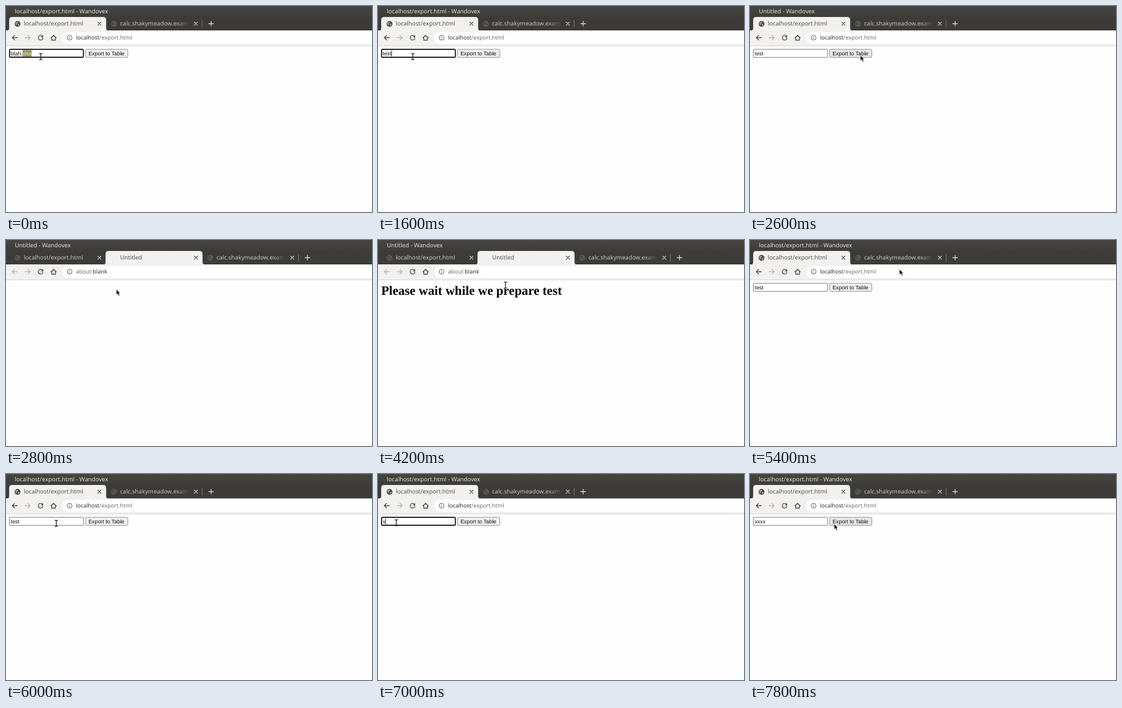
An HTML page that plays this animation: 600x338 px, repeating every 8 s.

```html
<!DOCTYPE html>
<html lang="en">
<head>
<meta charset="utf-8">
<title>Export demo</title>
<style>
  html, body { margin: 0; width: 100%; height: 100%; overflow: hidden; background: #fefefe; }
  svg { display: block; width: 100vw; height: 100vh; }
  text { text-rendering: geometricPrecision; white-space: pre; }
  .ui { font-family: "Noto Sans", "Open Sans", sans-serif; font-size: 9.68px; }
  .url { font-size: 9.1px; }
  .form { font-family: "Liberation Sans", Arial, sans-serif; font-size: 8.85px; }
  .heading { font: bold 21.1px "Liberation Serif", "Times New Roman", serif; }
  .line { fill: none; stroke-width: 1.3; stroke-linecap: round; }
</style>
</head>
<body>
<svg viewBox="0 0 600 338" xmlns="http://www.w3.org/2000/svg">
  <defs>
    <linearGradient id="bar" x2="0" y2="1">
      <stop stop-color="#46453f"/><stop offset=".5" stop-color="#3c3b37"/>
    </linearGradient>
    <linearGradient id="fade" gradientUnits="userSpaceOnUse" x1="92" x2="115">
      <stop stop-color="#c3c2be"/><stop offset="1" stop-color="#c3c2be" stop-opacity="0"/>
    </linearGradient>
    <path id="tabShape" d="M-4 40.5Q0 40.5 0 36V23Q0 18 5 18H154Q159 18 159 23V36Q159 40.5 163 40.5Z"/>
    <path id="cross" class="line" d="M-2.5-2.5L2.5 2.5M2.5-2.5L-2.5 2.5"/>
    <g id="globe">
      <circle r="4.8" fill="currentColor"/>
      <path d="M-3.6-1.8Q-1-4 1-3.5L.6-1.4L-1.4-.4L-.6 1.4L-2 2.4L-3.7.4ZM1.2.3L3.6-.2Q3.6 2.4 1.2 3.6L.2 2Z" opacity=".55"/>
    </g>
  </defs>

  <rect width="600" height="338" fill="#fefefe"/>
  <rect width="600" height="41" fill="url(#bar)"/>
  <text id="title" class="ui" x="14.5" y="12.4" fill="#e2dfd8"/>
  <g id="tabs" class="ui"></g>

  <rect y="40" width="600" height="25" fill="#f2f1f0"/>
  <path d="M0 65.5H600" stroke="#d9d8d6"/>
  <rect x="92" y="42.5" width="530" height="19.5" rx="9.75" fill="#fff"/>
  <path id="back" class="line" d="M18.5 52H10.5M14 48.2L10.3 52L14 55.8"/>
  <path class="line" stroke="#b9b8b6" d="M31.5 52H39.5M36 48.2L39.7 52L36 55.8"/>
  <path class="line" stroke="#4c4c4c" d="M59.7 49.4A3.9 3.9 0 1 0 60.5 53"/>
  <path fill="#4c4c4c" d="M61 47.4V51.6H56.8Z"/>
  <path class="line" stroke="#4c4c4c" d="M73.6 52.3L78 48.2L82.4 52.3M75 51.5V56H81V51.5"/>
  <g stroke="#666" fill="none">
    <circle cx="104.3" cy="52" r="4"/>
    <path d="M104.3 51.5V54.4M104.3 49.6V50.5"/>
  </g>
  <text class="ui url" x="114.7" y="55.3"><tspan id="urlA"/><tspan id="urlB"/></text>

  <g id="form" class="form">
    <rect id="field"/>
    <rect id="highlight" y="72.5" height="10.6" fill="#8d9653"/>
    <text id="plain" x="7.7" y="80.6" fill="#111"/>
    <text id="picked" y="80.6" fill="#f1f1dd"/>
    <path id="squiggle" d="M8 82.3H25.5" stroke="#d9573c" stroke-width=".8" stroke-dasharray="1.2 .8"/>
    <path id="caret" stroke="#111" stroke-width=".8"/>
    <rect id="button" x="130.3" y="71" width="69.4" height="13.3" rx="1.8" stroke="#7b7b7b" stroke-width=".8"/>
    <text x="135.2" y="80.6" fill="#111">Export to Table</text>
  </g>
  <text id="heading" class="heading" x="5.2" y="90">Please wait while we prepare test</text>

  <path id="arrow" d="M0 0V9L2.1 7.1L3.7 10.6L5.4 9.8L3.8 6.5H6.5Z" fill="#080808" stroke="#fff" stroke-width=".6"/>
  <path id="beam" class="line" d="M-2-5Q0-5 0-4Q0-5 2-5M0-4V4M-2 5Q0 5 0 4Q0 5 2 5" stroke="#222"/>
</svg>

<script>
const LOOP = 8000, TICK = 200, PITCH = 158;
const PAGE = "localhost/export.html", BLANK = "Untitled", OTHER = "calc.shakymeadow.example";
const $ = id => document.getElementById(id);
const set = (id, attrs) => {
  for (const key in attrs) $(id).setAttribute(key, attrs[key]);
};
const show = (id, on) => set(id, { visibility: on ? "visible" : "hidden" });
const arrow = (x, y) => ({ cursor: "arrow", x, y });
const beam = (x, y) => ({ cursor: "beam", x, y });

// Each step changes only the properties it lists.
const steps = [
  [0, { value: "blah.", selected: "xlsx", focus: true, title: PAGE, ...beam(57, 83) }],
  [200, { value: "", selected: "" }],
  [1000, { value: "t" }],
  [1200, { value: "te" }],
  [1400, { value: "tes" }],
  [1600, { value: "test" }],
  [1800, arrow(118, 94)],
  [2000, arrow(180, 90)],
  [2200, { hover: "button", ...arrow(181, 81) }],
  [2400, { hover: "pressed", focus: false }],
  [2600, { hover: "button", title: BLANK }],
  [2800, { hover: "", popup: true }],
  [3000, { heading: true }],
  [4200, beam(209, 74)],
  [4400, arrow(268, 52)],
  [4600, { hover: "other", ...arrow(342, 34) }],
  [4800, { hover: "close", ...arrow(314, 30) }],
  [5000, arrow(309, 29)],
  [5200, { title: PAGE, ...arrow(292, 33) }],
  [5400, { hover: "", popup: false, heading: false, ...arrow(245, 48) }],
  [5600, arrow(160, 75)],
  [5800, beam(105, 83)],
  [6000, beam(82.5, 81)],
  [6200, beam(50, 82)],
  [6400, { value: "", selected: "test", focus: true, ...beam(30, 80) }],
  [7000, { value: "x", selected: "" }],
  [7200, { value: "xxx" }],
  [7400, { value: "xxxx" }],
  [7600, { hover: "button", ...arrow(138, 82) }],
  [7800, { focus: false }]
];

const stateAt = time => Object.assign({}, ...steps.filter(([at]) => at <= time).map(([, change]) => change));

function tab(index, label, active, hover) {
  const ink = active ? "#555" : "#c3c2be";
  const fill = active ? "#f2f1f0" : hover === "other" && label === OTHER ? "#53524d" : "none";
  const closeHover = active && hover === "close";
  const globe = label === BLANK ? "" :
    `<use href="#globe" x="13.7" y="29.3" color="${active ? "#454545" : "#5d5c57"}" fill="${active ? "#f2f1f0" : "#35342f"}"/>`;
  const text = label === OTHER
    ? `<text transform="translate(23.7 32.4)" fill="url(#fade)">${label.slice(0, 21)}</text>`
    : `<text x="23.7" y="32.4" fill="${ink}">${label}</text>`;
  return `<g transform="translate(${5.2 + index * PITCH} 0)">
    <use href="#tabShape" fill="${fill}"/>${globe}${text}
    ${closeHover ? '<circle cx="148" cy="29" r="5.4" fill="#bdbcba"/>' : ""}
    <use href="#cross" x="148" y="29" stroke="${ink}"/></g>`;
}

function drawTabs({ popup, hover }) {
  const labels = popup ? [PAGE, BLANK, OTHER] : [PAGE, OTHER];
  const activeIndex = popup ? 1 : 0;
  const end = 5.5 + labels.length * PITCH;
  const divider = hover === "other" ? "" : `<path d="M${end} 23V35" stroke="#77766f"/>`;
  const order = labels.map((_, i) => i).sort((a, b) => (a === activeIndex) - (b === activeIndex));
  $("tabs").innerHTML = order.map(i => tab(i, labels[i], i === activeIndex, hover)).join("") + divider +
    `<path class="line" stroke="#d2d1cd" d="M${end + 11} 29H${end + 18.6}M${end + 14.8} 25.2V32.8"/>`;
}

function drawForm({ value, selected, focus, hover }) {
  $("plain").textContent = value;
  $("picked").textContent = selected;
  const start = 7.7 + (value ? $("plain").getComputedTextLength() : 0);
  set("picked", { x: start });
  set("highlight", { x: start, width: selected ? $("picked").getComputedTextLength() : 0 });
  set("caret", { d: `M${start + .4} 72.8V82.8` });
  set("field", focus
    ? { x: 5.8, y: 71.2, width: 121, height: 12.9, rx: 1.4, fill: "#fff", stroke: "#101010", "stroke-width": 1.7 }
    : { x: 5.5, y: 71.1, width: 121.6, height: 13.2, rx: .8, fill: "#fff", stroke: "#707070", "stroke-width": .9 });
  set("button", { fill: hover === "pressed" ? "#f5f5f5" : hover === "button" ? "#e6e6e6" : "#efefef" });
  $("caret").style.display = focus && !selected ? "" : "none";
  $("squiggle").style.display = value === "blah." ? "" : "none";
}

function draw(time) {
  const state = stateAt(time);
  const { popup, cursor, x, y } = state;
  $("title").textContent = state.title + " - Wandovex";
  drawTabs(state);
  drawForm(state);
  $("urlA").textContent = popup ? "about:" : "localhost";
  $("urlB").textContent = popup ? "blank" : "/export.html";
  set("urlA", { fill: popup ? "#707070" : "#333" });
  set("urlB", { fill: popup ? "#333" : "#707070" });
  set("back", { stroke: popup ? "#b9b8b6" : "#4c4c4c" });
  $("form").style.display = popup ? "none" : "";
  show("heading", state.heading);
  for (const id of ["arrow", "beam"]) show(id, id === cursor);
  set(cursor, { transform: `translate(${x} ${y})` });
}

let drawn = -1;
const origin = performance.now();
function frame(now) {
  const time = Math.floor(Math.max(0, now - origin) % LOOP / TICK) * TICK;
  if (time !== drawn) draw(drawn = time);
  requestAnimationFrame(frame);
}
frame(origin);
</script>
</body>
</html>
```
